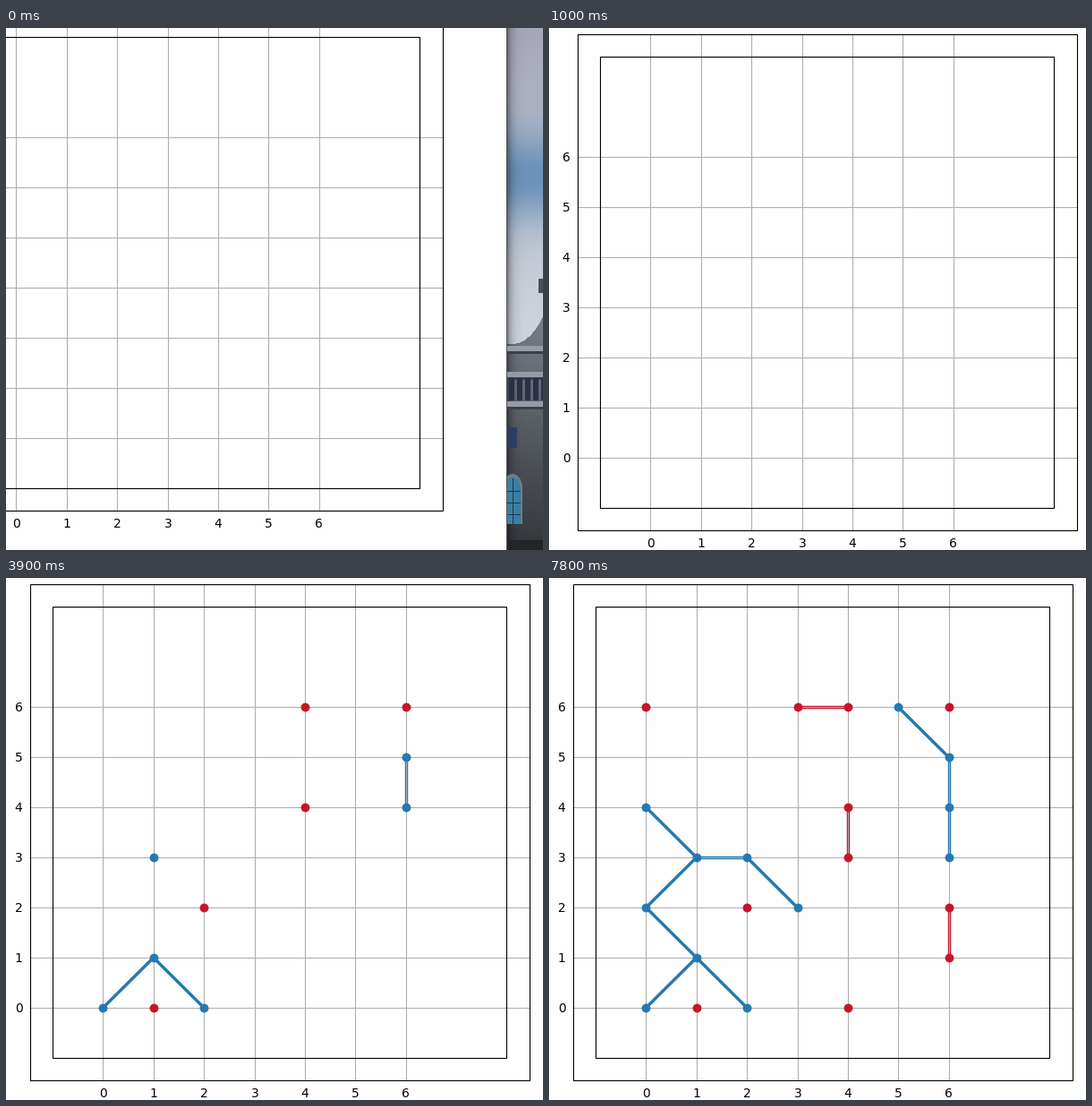
Animation, 600 px wide and 583 px high, one loop 8 s. Source, as a matplotlib script:

```python
import matplotlib.pyplot as plt
import numpy as np
from matplotlib.animation import FuncAnimation
from matplotlib.patches import Ellipse, Rectangle
from matplotlib.transforms import Affine2D

W, H, STEP, LOOP = 600, 583, 100, 8000
BLUE, RED, PAPER, GRID = "#2479b1", "#c8142b", "#fefefe", "#b0b0b0"

# Plot frame in stage pixels; data runs from -1.45 to 8.45 on both axes
LEFT, TOP, PLOT_W, PLOT_H = 26.7, 7.1, 558, 554
RIGHT, BOTTOM = LEFT + PLOT_W, TOP + PLOT_H
UNIT_X, UNIT_Y = PLOT_W / 9.9, PLOT_H / 9.9

# Cells each player takes, as (column, row), in order of play
BLUE_CELLS = [(1, 3), (0, 0), (6, 5), (2, 0), (6, 4), (1, 1),
              (6, 3), (2, 3), (0, 2), (3, 2), (5, 6), (0, 4)]
RED_CELLS = [(1, 0), (4, 6), (2, 2), (4, 4), (6, 6), (4, 0),
             (4, 3), (3, 6), (6, 2), (6, 1), (0, 6)]

fig = plt.figure(figsize=(W / 100, H / 100), dpi=100, facecolor=PAPER)
ax = fig.add_axes([0, 0, 1, 1])
slide = Affine2D()
moving = slide + ax.transData


def px(col):
    return LEFT + (col + 1.45) * UNIT_X


def py(row):
    return TOP + (8.45 - row) * UNIT_Y


def line(xs, ys, color, width, z, **kw):
    return ax.plot(xs, ys, color=color, lw=width, zorder=z,
                   transform=moving, **kw)[0]


def frame(x0, y0, x1, y1):
    ax.add_patch(Rectangle((x0, y0), x1 - x0, y1 - y0, fill=False, ec="black",
                           lw=0.8, zorder=6, transform=moving))


def block(x, y, w, h, color):
    ax.add_patch(Rectangle((x, y), w, h, fc=color, ec="none", zorder=0.5))


def mix(a, b, t):
    return np.array(a) + (np.array(b) - a) * t


def draw_backdrop():
    """Cloudy sky above a grey facade, shaded by the window's drop shadow."""
    x, y = np.arange(40)[None, :, None], np.arange(H)[:, None, None]
    clouds = mix((166, 168, 186), (206, 212, 220), np.clip(y / 330, 0, 1))
    sky = mix(clouds, (92, 138, 184), 0.85 * np.exp(-((y - 165) / 48) ** 2))
    wall = mix((118, 124, 133), (52, 55, 60), np.clip((y - 330) / 250, 0, 1))
    roof = 353 - 32 * (x / 40) ** 2.5
    shade = 1 - 0.4 * np.exp(-x / 5)
    picture = np.where(y < roof, sky, wall) * shade
    ax.imshow(picture.astype(np.uint8), extent=(560, W, H, 0), aspect="auto",
              zorder=0.1)
    block(595, 280, 5, 16, "#4b4d50")
    for top in (355, 384, 417):
        block(560, top, 40, 6, "#969ca5")
        block(560, top + 6, 40, 3, "#3c4047")
    for left in range(562, W, 9):
        block(left, 391, 6, 25, "#2a3048")
    block(560, 446, 11, 23, "#2c3d60")
    for pad, color in ((4, "#747b83"), (0, "#3b7fa5")):
        ax.add_patch(Ellipse((566, 514), 18 + pad, 24 + 2 * pad, fc=color,
                             zorder=0.5))
        block(560, 514, 15 + pad / 2, 40, color)
    for top in range(517, 550, 13):
        block(560, top, 15, 1, "#243848")
    block(566, 503, 1, 51, "#243848")
    block(560, 572, 40, 11, "#232426")


def draw_window():
    ax.add_patch(Rectangle((-200, -100), 856, 800, fc=PAPER, ec="#55585c",
                           lw=0.8, zorder=1, transform=moving))
    label = dict(va="baseline", fontsize=10, family="DejaVu Sans", zorder=6,
                 transform=moving)
    for i in range(7):
        line([px(i)] * 2, [TOP, BOTTOM], GRID, 0.8, 4)
        line([LEFT, RIGHT], [py(i)] * 2, GRID, 0.8, 4)
        ax.text(px(i) + 0.3, BOTTOM + 19, str(i), ha="center", **label)
        ax.text(LEFT - 8.3, py(i) + 5.2, str(i), ha="right", **label)
    frame(LEFT, TOP, RIGHT, BOTTOM)
    frame(px(-1), py(8), px(8), py(-1))


def red_time(k):
    """Red moves every 400 ms at first and hesitates more and more."""
    return 2100 + 400 * k + 1400 * (k / 10) ** 3.5


def blue_time(k):
    return red_time(k - 1) + 185 if k else 1900


def make_pieces(cells, color, time_of):
    """Each move brings a dot and links to earlier neighbours of its colour."""
    pieces = []
    for k, (col, row) in enumerate(cells):
        start = round(time_of(k) / STEP) * STEP
        pieces.append((start, line([px(col)], [py(row)], color, 0, 5,
                                   marker="o", ms=7.1, mew=0)))
        for c, r in cells[:k]:
            if max(abs(c - col), abs(r - row)) == 1:
                link = line([px(c), px(col)], [py(r), py(row)], color, 2.5, 3)
                pieces.append((start, link))
    return pieces


def window_offset(time):
    """Ease the window up from the lower left, then nudge it into place."""
    if time > 1000:
        return 0, 0
    u = np.clip((time - 700) / 200, 0, 1)
    eased = u * u * (3 - 2 * u)
    return -97 + 102 * eased, -22 * (1 - eased)


draw_backdrop()
draw_window()
pieces = (make_pieces(BLUE_CELLS, BLUE, blue_time)
          + make_pieces(RED_CELLS, RED, red_time))
ax.set_xlim(0, W)
ax.set_ylim(H, 0)
ax.axis("off")


def update(n):
    time = n * STEP
    slide.clear().translate(*window_offset(time))
    for start, artist in pieces:
        artist.set_visible(time >= start)
    return []


anim = FuncAnimation(fig, update, frames=LOOP // STEP, interval=STEP,
                     repeat=True, repeat_delay=0, blit=False)
plt.show()
```
